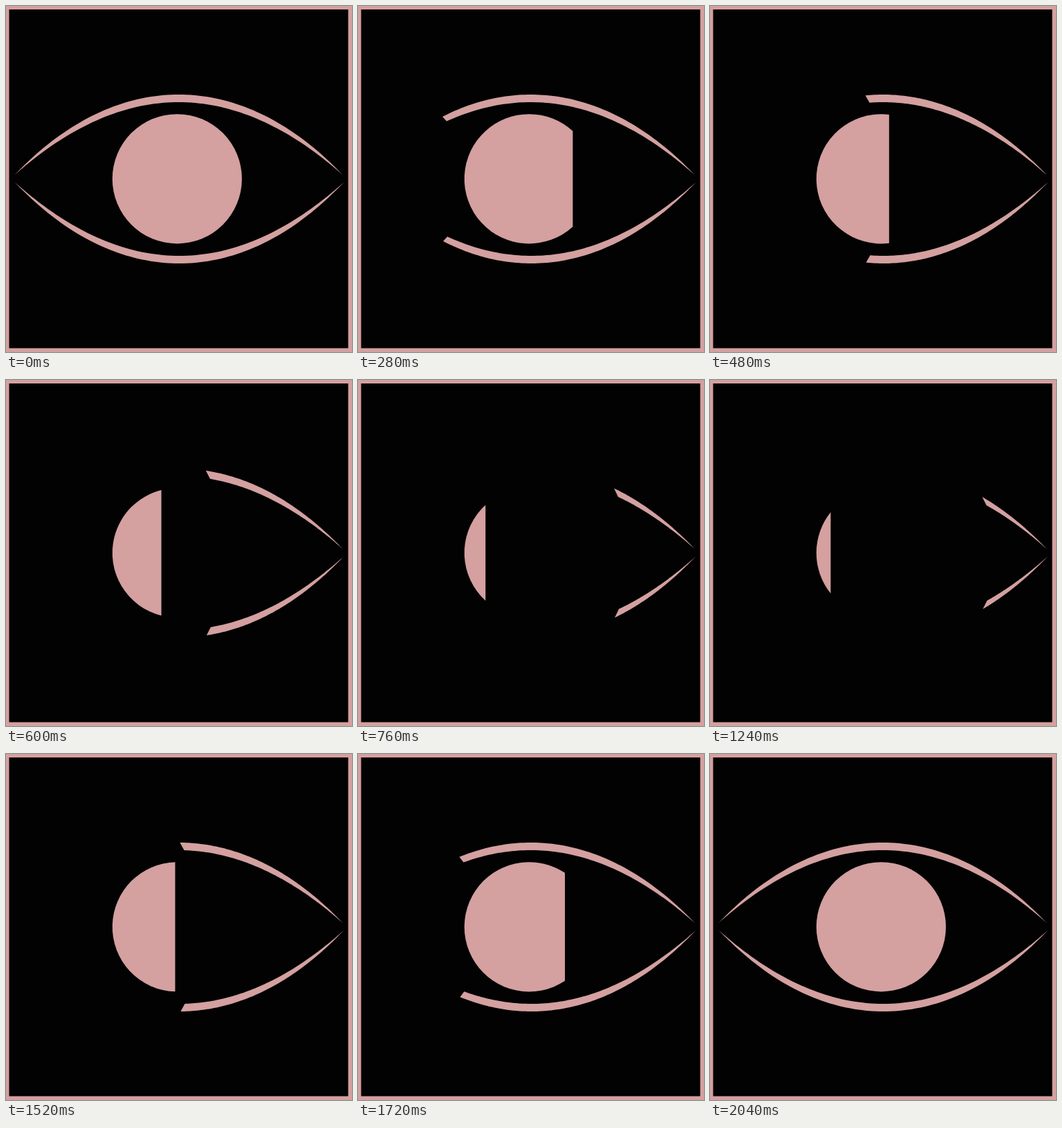
Write an HTML page with a canvas that moves like this. It is 500 by 500 pixels and loops after 4 s.

```html
<!DOCTYPE html>
<html lang="en">
<head>
<meta charset="utf-8">
<title>Blinking eye</title>
<style>
  html, body { margin: 0; width: 100%; height: 100%; overflow: hidden; background: #020202; }
  canvas { display: block; width: 100vmin; height: 100vmin; }
</style>
</head>
<body>
<canvas id="stage" width="500" height="500"></canvas>
<script>
const ctx = document.getElementById('stage').getContext('2d');
const PINK = '#d4a0a0';
const BLACK = '#020202';
const LOOP = 4000, STEP = 40;
const TURN = 1020;   // moment the eye is fully shut
const HALF = 237.5;  // half the width of a lid
const SLANT = 6;     // inner edge of a lid is cut this much further right

const clamp = (v, lo, hi) => Math.min(hi, Math.max(lo, v));

// 1 = open, 0 = shut
function openness(t) {
  const left = t < TURN ? TURN + 10 - t : t - TURN;
  return clamp(left / TURN, 0, 1);
}

// Arc from tip to tip; "square" weighs the parabola against a quartic.
function lidCurve(cx, peak, tip, square) {
  return x => {
    const q = ((x - cx) / HALF) ** 2;
    return peak + (tip - peak) * (square * q + (1 - square) * q * q);
  };
}

const lids = [
  { cx: 249.5, outer: [128, 244.5], inner: [139, 244.5] },
  { cx: 250.5, outer: [372, 255], inner: [361, 255] }
].map(({ cx, outer, inner }) => ({
  cx,
  outer: lidCurve(cx, ...outer, 0.933),
  inner: lidCurve(cx, ...inner, 1)
}));

function trace(curve, from, to) {
  const n = 80;
  for (let i = 0; i <= n; i++) {
    const x = from + (to - from) * i / n;
    ctx.lineTo(x, curve(x));
  }
}

function drawLid({ cx, outer, inner }, open) {
  const start = cx - HALF, end = cx + HALF;
  // Even speed along the arc: slower in x near the steep tips.
  const p = open - 0.022 * Math.sin(2 * Math.PI * open);
  const cut = end - 482 * p;
  const gap = SLANT * clamp((1 - open) * 20, 0, 1);
  ctx.beginPath();
  trace(outer, clamp(cut, start, end), end);
  trace(inner, end, clamp(cut + gap, start, end));
  ctx.fill();
}

function drawIris(open) {
  ctx.beginPath();
  ctx.arc(247.3, 249.8, 93.6, Math.PI * (1 - open), Math.PI * (1 + open));
  ctx.fill();
}

function draw(t) {
  ctx.fillStyle = PINK;
  ctx.fillRect(0, 0, 500, 500);
  ctx.fillStyle = BLACK;
  ctx.fillRect(4.5, 5, 490, 489.5);

  const open = openness(t);
  if (open < 0.03) return;
  ctx.fillStyle = PINK;
  lids.forEach(lid => drawLid(lid, open));
  drawIris(open);
}

const began = performance.now();
function tick() {
  const t = (performance.now() - began) % LOOP;
  draw(Math.floor(t / STEP) * STEP);
  requestAnimationFrame(tick);
}
tick();
</script>
</body>
</html>
```
